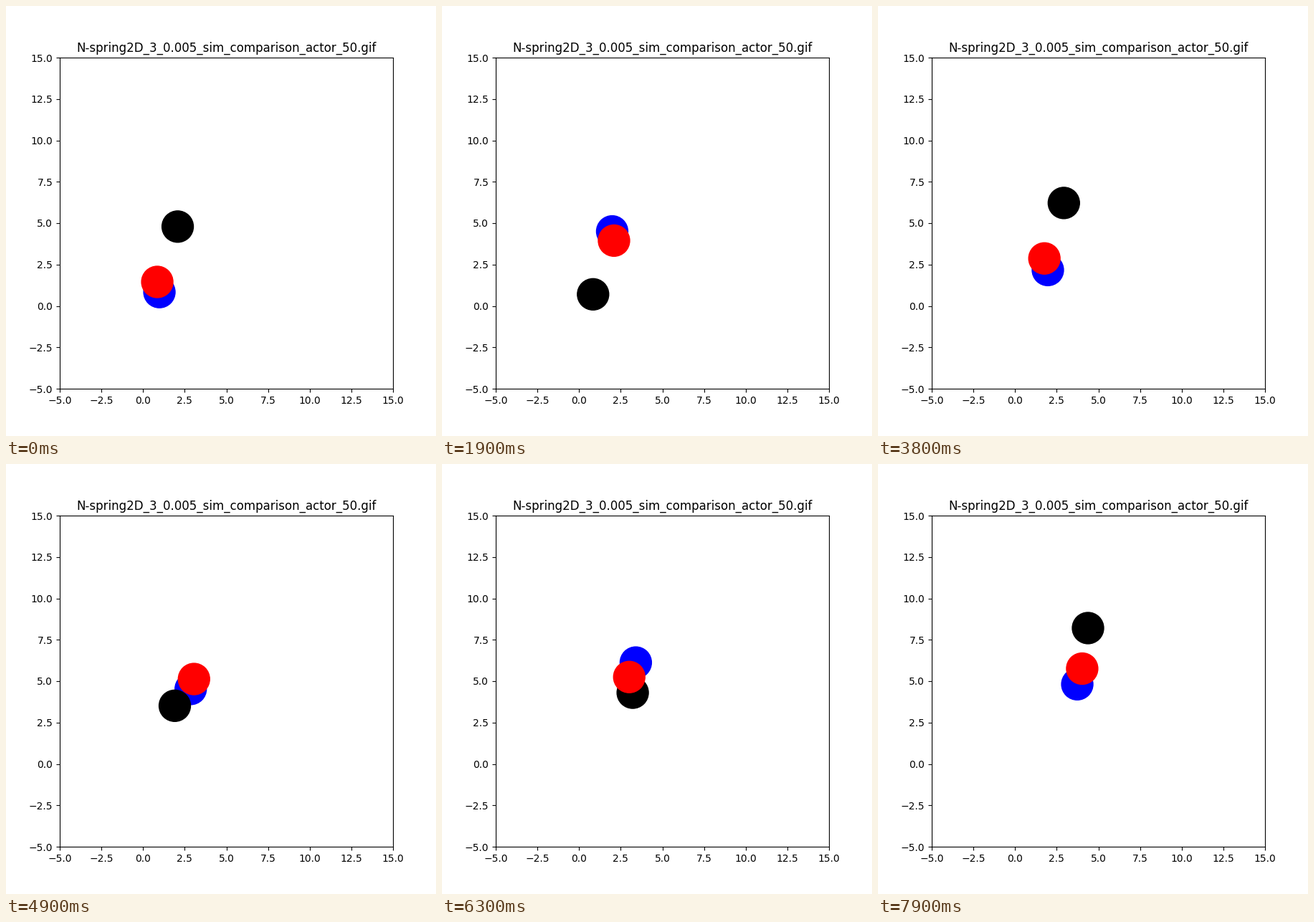
These frames come from a looping animation (600 by 600 pixels, 8000 ms). A matplotlib script:

```python
import numpy as np
import matplotlib.pyplot as plt
from matplotlib.animation import FuncAnimation

FRAMES = 80
PERIOD = 37.5     # frames per swing


def swing(t, rest, cos, cos_rate, sin, sin_rate):
    """Elliptic swing about the shared centre, its axes changing slowly."""
    phase = 2 * np.pi * t / PERIOD
    return (rest + (cos + cos_rate * t) * np.cos(phase)
            + (sin + sin_rate * t) * np.sin(phase))


def centre(t):
    """Accelerating drift of the three balls, with a faint wobble."""
    return (221.25 + 362.8j + (0.33 - 0.5775j) * t
            + (0.00605 - 0.00708j) * t**2
            + (0.3 + 1.2j) * np.cos(2 * np.pi * t / PERIOD))


def positions(t):
    """Blue, black and red in stage pixels, as x + yj."""
    blue = swing(t, 0.8 + 1.2j, -8.3 + 34j, 0.03 + 0.02j,
                 16.6 + 10.5j, -0.28 - 0.045j)
    black = swing(t, -0.7 - 1.2j, 18.7 - 55j, -0.015 - 0.03j,
                  -12.3 + 1.9j, 0.047)
    red = -(blue + black)     # equal masses balance out
    return centre(t) + np.array([blue, black, red])


def to_axes(p):
    return np.column_stack([(p.real - 75) / 23.25 - 5,
                            15 - (p.imag - 72) / 23.1])


fig, ax = plt.subplots(figsize=(6, 6), dpi=100)
ax.set_xlim(-5, 15)
ax.set_ylim(-5, 15)
ax.set_title("N-spring2D_3_0.005_sim_comparison_actor_50.gif")
start = to_axes(positions(0))
balls = ax.scatter(start[:, 0], start[:, 1], s=1000, linewidths=1,
                   c=["blue", "black", "red"])


def update(i):
    balls.set_offsets(to_axes(positions(i)))
    return (balls,)


anim = FuncAnimation(fig, update, frames=FRAMES, interval=100,
                     repeat=True, repeat_delay=0)
plt.show()
```
